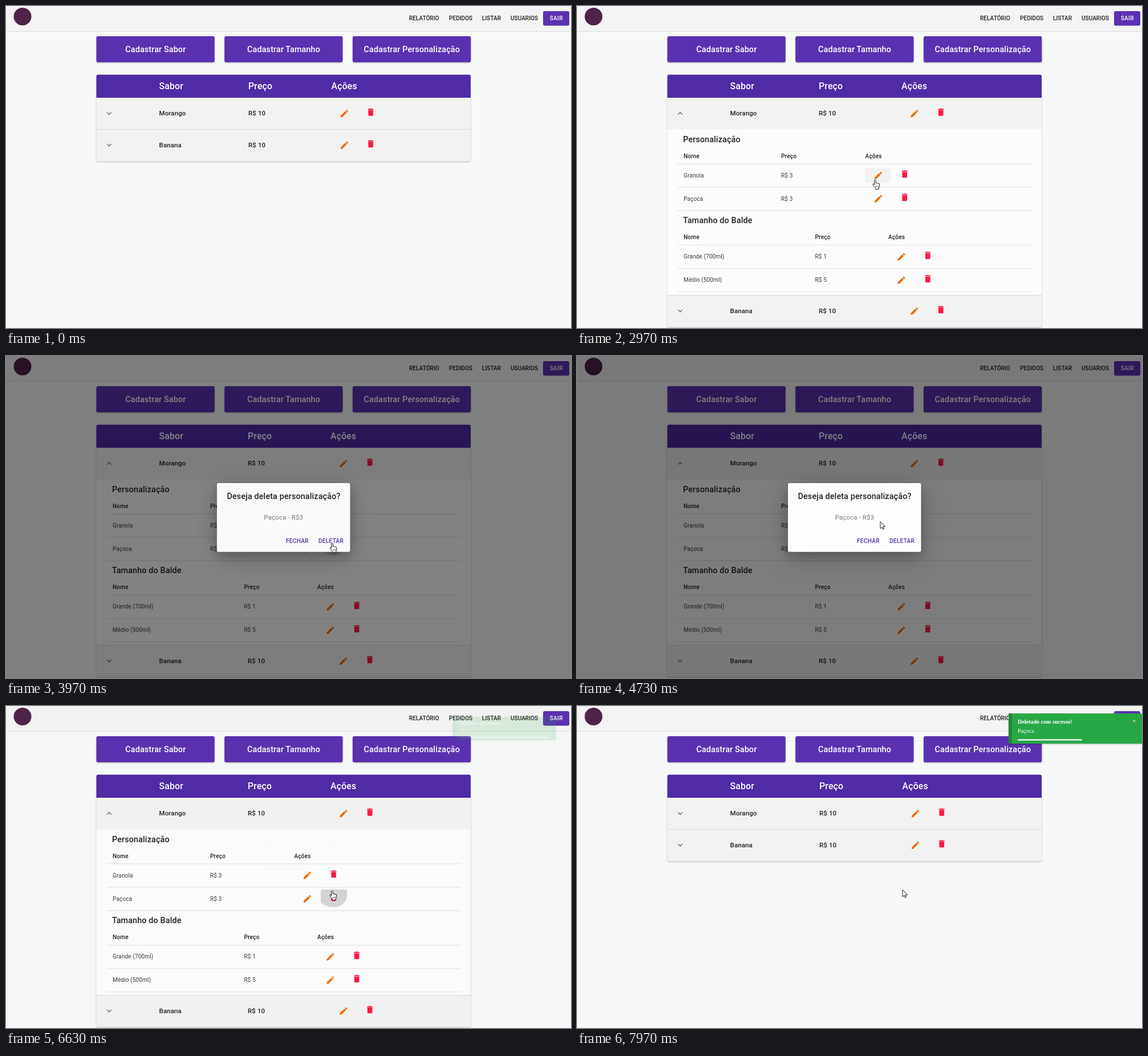
An HTML page for the animation above (8 s loop, 991 px wide and 565 px high).

```html
<!DOCTYPE html>
<html lang="pt-BR">
<head>
<meta charset="utf-8">
<title>Cardápio</title>
<style>
  html, body { margin: 0; width: 100%; height: 100%; overflow: hidden; background: #f7f8f8; }
  svg { display: block; width: 991px; height: 565px; font-family: Roboto, sans-serif; }
  text { fill: #212121; white-space: pre; }
  .nav { font-size: 10.08px; font-weight: 500; }
  .btn { font-size: 10.08px; font-weight: 500; letter-spacing: .0286em; fill: #512da8; }
  .h6 { font-size: 14.4px; font-weight: 500; letter-spacing: .0075em; }
  .head { font-size: 15.84px; font-weight: 500; letter-spacing: .0107em; }
  .row { font-size: 11.52px; font-weight: 500; letter-spacing: .0094em; }
  .th { font-size: 10.08px; font-weight: 500; letter-spacing: .017em; }
  .td { font-size: 10.08px; letter-spacing: .0107em; fill: #3a3a3a; }
  .body { font-size: 11.52px; letter-spacing: .0094em; fill: #777; }
  .toast { font: 10.08px "Liberation Serif", serif; }
  .bold { font-weight: 700; }
  .white { fill: #fff; }
  .mid { text-anchor: middle; }
  .shadow { filter: drop-shadow(0 1.5px 1px rgba(0,0,0,.28)); }
  .deep { filter: drop-shadow(0 8px 9px rgba(0,0,0,.2)) drop-shadow(0 8px 20px rgba(0,0,0,.2)); }
</style>
</head>
<body>
<svg id="stage" viewBox="0 0 991 565"></svg>
<script>
const LOOP = 8000, SUB_H = 291;
const PURPLE = '#5a32b0', DARK = '#4f2ba6';
const PENCIL = 'M3 17.25V21h3.75L17.81 9.94l-3.75-3.75zM20.71 7.04c.39-.39.39-1.02 0-1.41l-2.34-2.34c-.39-.39-1.02-.39-1.41 0l-1.83 1.83 3.75 3.75z';
const TRASH = 'M6 19c0 1.1.9 2 2 2h8c1.1 0 2-.9 2-2V7H6zM19 4h-3.5l-1-1h-5l-1 1H5v2h14z';
const CHEVRON = 'M7.41 8.59 12 13.17l4.59-4.58L18 10l-6 6-6-6z';

const rect = (x, y, w, h, fill, more = '') =>
  `<rect x="${x}" y="${y}" width="${w}" height="${h}" fill="${fill}" ${more}/>`;
const text = (x, y, cls, s) => `<text x="${x}" y="${y}" class="${cls}">${s}</text>`;
const icon = (x, y, d, fill) =>
  `<path transform="translate(${x} ${y}) scale(.72) translate(-12 -12)" d="${d}" fill="${fill}"/>`;
const actions = (x, y) => icon(x, y, PENCIL, '#ef6c00') + icon(x + 46.2, y - 2.5, TRASH, '#ff1744');
const rule = (x, y, w, color = '#e0e0e3') => rect(x, y, w, 1, color);

const bigButton = (x, s) =>
  rect(x, 53, 207.3, 45.7, PURPLE, 'rx="3" class="shadow"') + text(x + 103.8, 81, 'h6 white mid', s);

const mainRow = (id, y, name) =>
  `<g id="${id}">` + text(268.5, y + 3.9, 'row', name) +
  `<g class="price">${text(425, y + 3.9, 'row', 'R$ 10')}</g>` +
  `<g class="act">${actions(593.5, y + .4)}</g></g>`;

const subTable = (y, title, priceX, actX, rows) =>
  text(186, y, 'h6', title) + text(187, y + 28, 'th', 'Nome') +
  text(priceX, y + 28, 'th', 'Preço') + text(actX, y + 28, 'th', 'Ações') +
  rule(176, y + 38, 622) +
  rows.map(([name, price], i) => {
    const b = y + 62 + i * 41;
    return text(187, b, 'td', name) + text(priceX, b, 'td', price) +
      actions(actX + 23, b - 3.2) + rule(176, b + 17, 622);
  }).join('');

document.getElementById('stage').innerHTML = `
  <defs>
    <clipPath id="subClip">${rect(158, 216.5, 658, 0, '#000', 'id="subBox"')}</clipPath>
  </defs>
  ${rect(0, 0, 991, 565, '#f7f8f8')}
  ${rect(0, 0, 991, 44.5, '#f4f4f4')}${rule(0, 44, 991, '#dbdbde')}
  <circle cx="29" cy="18.5" r="15.5" fill="#4d2348"/>
  ${text(707, 25, 'nav', 'RELATÓRIO')}${text(777, 25, 'nav', 'PEDIDOS')}
  ${text(835, 25, 'nav', 'LISTAR')}${text(885, 25, 'nav', 'USUARIOS')}
  ${rect(942, 9, 46, 25.5, PURPLE, 'rx="3"')}${text(965.2, 24.6, 'btn white mid', 'SAIR')}
  ${bigButton(158.5, 'Cadastrar Sabor')}
  ${bigButton(383.2, 'Cadastrar Tamanho')}
  ${bigButton(608, 'Cadastrar Personalização')}
  ${rect(158.5, 121, 656.5, 151.5, '#f2f2f2', 'id="card" rx="3" class="shadow"')}
  <path d="M158.5 161v-37.5a3 3 0 0 1 3-3h650.5a3 3 0 0 1 3 3V161z" fill="${DARK}"/>
  ${text(268.5, 145.8, 'head white', 'Sabor')}
  <g class="price">${text(425, 145.8, 'head white', 'Preço')}</g>
  <g class="act">${text(570.5, 145.8, 'head white', 'Ações')}</g>
  <circle id="chevHover" cx="181" cy="188.5" r="11" fill="#000" opacity=".06"/>
  <g id="chevA">${icon(181, 188.5, CHEVRON, '#737373')}</g>
  ${mainRow('rowA', 188.3, 'Morango')}
  <g clip-path="url(#subClip)">
    ${rect(158.5, 216.5, 656.5, SUB_H, '#fcfcfc')}
    ${rect(505, 284.5, 46, 26, '#f2f2f2', 'id="editHover" rx="3"')}
    ${rect(552, 323, 46, 28, '#f2f2f2', 'id="delHover" rx="3"')}
    <path id="ripple" d="M552 325q0-3 3-3h40q3 0 3 3v8a24 20 0 0 1-24 20q-12 0-22-8z" fill="#d4d4d4"/>
    ${subTable(238.5, 'Personalização', 358, 505.5, [['Granola', 'R$ 3'], ['Paçoca', 'R$ 3']])}
    ${subTable(381.3, 'Tamanho do Balde', 417.5, 546, [['Grande (700ml)', 'R$ 1'], ['Médio (500ml)', 'R$ 5']])}
  </g>
  <g id="below">
    ${rule(158.5, 216, 656.5, '#d9d9dc')}
    ${icon(181, 244, CHEVRON, '#737373')}
    ${mainRow('rowB', 243.8, 'Banana')}
  </g>
  ${rect(0, 0, 991, 565, '#000', 'id="shade"')}
  <g id="dialog">
    ${rect(370, 223, 233.5, 120.7, '#fdfdfd', 'rx="3" class="deep"')}
    ${text(387.5, 250.7, 'h6', 'Deseja deleta personalização?')}
    ${text(486.8, 287, 'body mid', 'Paçoca - R$3')}
    ${rect(541, 311.5, 58, 26, PURPLE, 'id="okHover" rx="3" opacity=".05"')}
    ${text(491, 328, 'btn', 'FECHAR')}${text(548, 328, 'btn', 'DELETAR')}
  </g>
  <g id="toast">
    ${rect(757, 13, 234, 53, '#28a745', 'rx="1.5" class="shadow"')}
    ${rect(757, 13, 5.8, 53, '#1f8838')}
    ${text(773, 30.5, 'toast bold white', 'Deletado com sucesso!')}
    ${text(773, 47, 'toast white', 'Paçoca')}
    <path d="M975.3 24.3l4 4m0-4l-4 4" stroke="#fff"/>
    ${rect(773, 58.3, 202.5, 2.2, '#fff', 'id="bar"')}
  </g>
  <g id="cursor" stroke="#000" fill="#fff" stroke-linejoin="round">
    <path id="arrow" d="M0 .5v12.3l2.8-2.6 1.8 4 1.9-.8-1.8-4h4z" stroke-width=".9"/>
    <g id="hand">
      <path d="M-1.4 1.5q0-1.3 1.3-1.3t1.3 1.3v4.3q1.3-.8 2.3.4 1.3-.7 2.2.5 1.8-.4 1.8 1.3v3.5q0 1.5-1.1 2.7v2.2h-6v-2q-2-1.6-3.2-3.9l-1.2-1.9q-.4-1.1.7-1.4 1-.2 1.9 1.4z" stroke-width=".9"/>
      <path d="M1.5 10.5v3m2-3v3m2-3v3" stroke-width=".6" fill="none"/>
    </g>
  </g>`;

const $ = id => document.getElementById(id);
const clamp = v => Math.max(0, Math.min(1, v));
const span = (t, a, d) => clamp((t - a) / d);
const within = (t, ...pairs) => pairs.some(([a, b]) => t >= a && t < b);
const show = (id, on) => $(id).setAttribute('visibility', on ? 'visible' : 'hidden');
const move = (el, x, y) => el.setAttribute('transform', `translate(${x} ${y})`);
const zoom = (id, s, x, y) =>
  $(id).setAttribute('transform', `translate(${x} ${y}) scale(${s}) translate(${-x} ${-y})`);

function bezier(x1, y1, x2, y2) {
  const at = (a, b, u) => 3 * a * u * (1 - u) ** 2 + 3 * b * u * u * (1 - u) + u ** 3;
  return x => {
    if (x <= 0 || x >= 1) return clamp(x);
    let lo = 0, hi = 1;
    for (let i = 0; i < 22; i++) {
      const m = (lo + hi) / 2;
      if (at(x1, x2, m) < x) lo = m; else hi = m;
    }
    return at(y1, y2, lo);
  };
}
const standard = bezier(.4, 0, .2, 1);
const bounce = bezier(.215, .61, .355, 1);
const smooth = x => x * x * (3 - 2 * x);

// time, x, y of the pointer tip
const PATH = [
  [430, 13, 184], [1230, 179, 188], [2080, 179, 188], [2800, 523, 305],
  [2970, 523, 305], [3650, 574, 330], [3900, 574, 330], [4500, 532, 290],
  [5290, 532, 290], [5480, 498, 283], [5870, 572, 324], [6930, 572, 324],
  [7000, 571, 322], [LOOP, 571, 322]
];
function pointer(t) {
  const i = PATH.findIndex(p => p[0] > t);
  if (i < 1) return PATH[0].slice(1);
  const [a, x, y] = PATH[i - 1], [b, x2, y2] = PATH[i];
  const k = smooth((t - a) / (b - a));
  return [x + (x2 - x) * k, y + (y2 - y) * k];
}

const BOUNCE = [.3, 1.1, .9, 1.03, .97, 1];
function bounceScale(p) {
  const i = Math.min(4, Math.floor(p * 5));
  return BOUNCE[i] + (BOUNCE[i + 1] - BOUNCE[i]) * bounce(p * 5 - i);
}

function draw(t) {
  const open = within(t, [1610, 6720]);
  const h = open ? SUB_H * standard(span(t, 1610, 309)) : 0;
  $('card').setAttribute('height', 151.5 + h);
  $('subBox').setAttribute('height', h);
  move($('below'), 0, h);
  document.querySelectorAll('.price').forEach(el => move(el, open ? -1 : 0, 0));
  document.querySelectorAll('.act').forEach(el => move(el, open ? -1.5 : 0, 0));
  $('chevA').setAttribute('transform', open ? 'rotate(180 181 188.5)' : '');

  show('chevHover', within(t, [1150, 2200]));
  show('editHover', within(t, [2660, 3280]));
  show('delHover', within(t, [3330, 3760]));
  show('ripple', within(t, [3700, 3990], [6470, 6720]));
  zoom('ripple', .3 + .7 * standard(span(t, 3700, 550)), 575, 333);
  show('okHover', within(t, [5700, 6660]));

  const fade = t < 6000 ? standard(span(t, 3790, 225)) : 1 - standard(span(t, 6460, 195));
  $('shade').setAttribute('opacity', fade * .5);
  $('dialog').setAttribute('opacity', fade);

  const pop = span(t, 6594, 750);
  show('toast', pop > 0);
  $('toast').setAttribute('opacity', bounce(pop));
  zoom('toast', bounceScale(pop), 874, 39.5);
  $('bar').setAttribute('width', 202.5 * (1 - span(t, 7085, 2000)));

  const seen = t >= 430;
  const hand = within(t, [1110, 2180], [2640, 4130], [5700, 6940]);
  show('arrow', seen && !hand);
  show('hand', seen && hand);
  move($('cursor'), ...pointer(t));
}

const start = performance.now();
function tick() {
  draw((performance.now() - start) % LOOP);
  requestAnimationFrame(tick);
}
tick();
</script>
</body>
</html>
```
